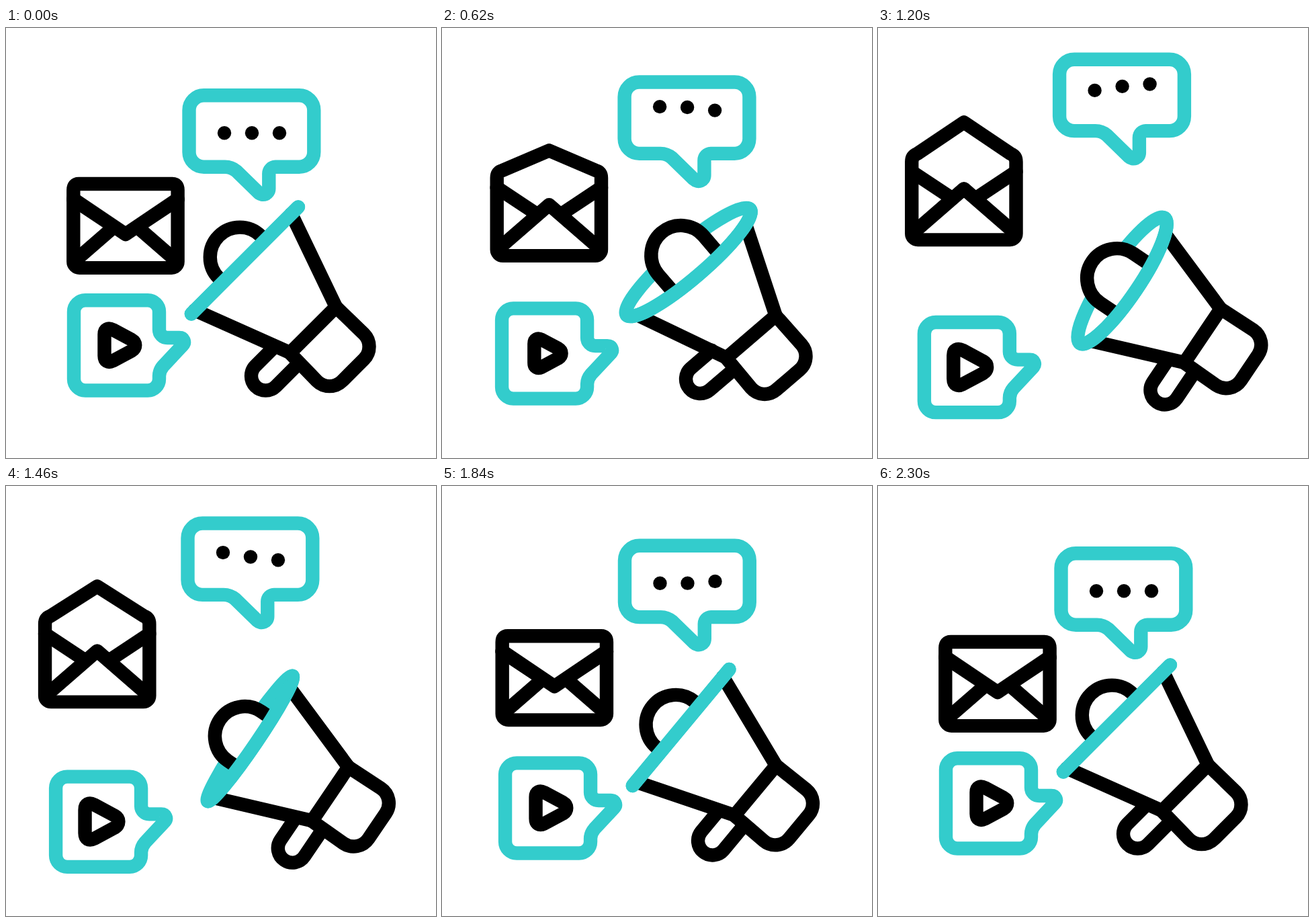
These frames come from a looping animation (640 px wide and 640 px high, 2600 ms). An HTML page:

```html
<!DOCTYPE html>
<html lang="en">
<head>
<meta charset="utf-8">
<title>Marketing icons</title>
<style>
  html, body { margin: 0; width: 100%; height: 100%; overflow: hidden; background: #fff; }
  svg { display: block; width: 100%; height: 100%; }
  .line { fill: none; stroke: #000; stroke-width: 20.4; stroke-linecap: round; stroke-linejoin: round; }
  .teal { stroke: #33cccc; }
  .solid { fill: #fff; }
  .butt { stroke-linecap: butt; }
</style>
</head>
<body>
<svg viewBox="0 0 640 640">
  <g id="chat">
    <path class="line teal" d="M294.5 100.3H436.3a22 22 0 0 1 22 22V184.7a22 22 0 0 1-22 22H401a10 10 0 0 0-9.7 10V239c0 8-9 12-15.5 6L343 213q-7.5-6.3-17-6.3H294.5a22 22 0 0 1-22-22V122.3a22 22 0 0 1 22-22Z"/>
    <circle class="dot" cx="325" r="10.2"/>
    <circle class="dot" cx="366" r="10.2"/>
    <circle class="dot" cx="407" r="10.2"/>
  </g>
  <g id="video">
    <path class="line teal" d="M118 405.3H211a17 17 0 0 1 17 17V449a12 12 0 0 0 12 12H258c6.5 0 9 6.5 5 11L234 503q-6 7-6 15V522.5a17 17 0 0 1-17 17H118a17 17 0 0 1-17-17V422.3a17 17 0 0 1 17-17Z"/>
    <path id="play" class="line" d="M146.5 456C146.5 448 152 445.5 159 449L187 464C194 468 194 476 187 480.5L159 495.5C152 499 146.5 496 146.5 488Z"/>
  </g>
  <g id="mail">
    <path id="outline" class="line"/>
    <path class="line" d="M100.3 255.5L178 307L255.6 255.5"/>
    <path class="line solid" d="M102 347L178 281L254 347"/>
    <path id="flap" class="line solid"/>
  </g>
  <g id="horn">
    <path id="cone" class="line"/>
    <path class="line" d="M122.2 59V99.7A21.5 21.5 0 0 0 165.2 99.7V51"/>
    <path class="line" d="M145-47L202.8-48A26.6 26.6 0 0 1 229.4-21.4V24.4A26.6 26.6 0 0 1 202.8 51L145 50Z"/>
    <path id="rim" class="line teal solid"/>
    <path id="knob" class="line solid butt"/>
    <path id="frontRim" class="line teal"/>
  </g>
</svg>
<script>
const LOOP = 2600, STEP = 20, STROKE = 20.4;
const $ = id => document.getElementById(id);
const set = (id, name, value) => $(id).setAttribute(name, value);
const dots = [...document.querySelectorAll('.dot')];
const smooth = u => u * u * u * (u * (6 * u - 15) + 10);

// Eases through [time, value, bias] keys; a bias below 1 makes the move start faster.
const motion = (...keys) => t => {
  const next = keys.findIndex(([time]) => time > t);
  if (next === 0) return keys[0][1];
  if (next < 0) return keys[keys.length - 1][1];
  const [t0, from] = keys[next - 1], [t1, to, bias = 1] = keys[next];
  return from + (to - from) * smooth(((t - t0) / (t1 - t0)) ** bias);
};

// Drifts out, snaps back past the rest position, rebounds and settles.
const swing = (far, over, rebound, bias) => motion(
  [220, 0], [1330, far, bias], [1375, far], [1690, over], [1860, rebound], [2230, 0]);

const spread = swing(-54, 19, -12, 0.83);
const mailX = swing(-50.5, 15.2, -11, 0.83);
const mailY = swing(-42, 9.5, -9, 0.76);
const flapFold = motion([220, 1], [800, -0.95], [1400, -0.95], [1800, 1]);
const playScale = motion([220, 1], [620, 0.88], [940, 1.09], [1460, 1.09], [1660, 1]);
const hornX = motion([220, 0], [680, 11.5], [1200, 8.2], [1440, 8], [1670, -5.2], [1910, 1.2], [2300, 0]);
const hornY = motion([410, 0], [1310, 30.5], [1430, 30.5], [1670, 0], [1910, 16], [2300, 0]);
const hornTilt = motion([220, 0], [620, -4.4], [1150, 11], [1430, 11], [1680, 1.2], [1920, 6.4], [2300, 0]);
const rimStretch = motion([220, 0], [620, 8.5], [940, 0]);
const rimDepth = motion([220, 0], [620, 24], [1300, 25], [1600, 0]);

function drawChat(t) {
  const y = spread(t);
  set('chat', 'transform', `translate(${0.045 * Math.min(y, 0)} ${y})`);
  dots.forEach((dot, i) => {
    const hops = (t - 366 - 51 * i) / 477;
    const lift = hops > 0 && hops < 3 ? 19.5 * Math.sin(Math.PI * hops) ** 2 : 0;
    dot.setAttribute('cy', 156.3 - lift);
  });
}

function drawVideo(t) {
  const d = spread(t), s = playScale(t);
  set('video', 'transform', `translate(${0.6 * d} ${-0.61 * d})`);
  set('play', 'transform', `translate(169.5 472) scale(${s}) translate(-169.5 -472)`);
  $('play').style.strokeWidth = STROKE / s;
}

function drawMail(t) {
  const fold = flapFold(t), top = 232, rise = 52.5 * Math.max(0, -fold);
  const shoulder = top - 0.06 * rise, hinge = top + 22.5 * fold;
  set('mail', 'transform', `translate(${mailX(t)} ${mailY(t)})`);
  set('outline', 'd', `M100.3 347.7V241Q100.3 232 108.3 ${shoulder}L178 ${top - rise}` +
    `L247.6 ${shoulder}Q255.6 232 255.6 241V347.7a9 9 0 0 1-9 9H109.3a9 9 0 0 1-9-9Z`);
  set('flap', 'd', fold > 0 ? `M100.3 ${hinge}L178 ${hinge + 52.5 * fold}L255.6 ${hinge}` : '');
}

function drawHorn(t) {
  const stretch = rimStretch(t), a = 112.5 + stretch, b = Math.max(rimDepth(t), 0.01);
  const base = -8.7 - 0.75 * stretch;
  const front = `M0 ${-a}A${b} ${a} 0 0 1 0 ${a}`;
  set('horn', 'transform',
    `translate(${355.4 + hornX(t)} ${345.9 + hornY(t)}) rotate(${45 - hornTilt(t)})`);
  set('rim', 'd', `${front}A${b} ${a} 0 0 1 0 ${-a}Z`);
  set('frontRim', 'd', front);
  set('cone', 'd', `M0 ${14.5 - a}L145-47M0 ${a - 7.5}L145 49.5`);
  set('knob', 'd', `M${b} -42.6H${base}A44.3 44.3 0 0 0 ${base} 46H${b}`);
}

function render(now) {
  const t = Math.floor(now % LOOP / STEP) * STEP;
  drawChat(t);
  drawVideo(t);
  drawMail(t);
  drawHorn(t);
}

let start;
function tick(now) {
  start ??= now;
  render(now - start);
  requestAnimationFrame(tick);
}
render(0);
requestAnimationFrame(tick);
</script>
</body>
</html>
```
